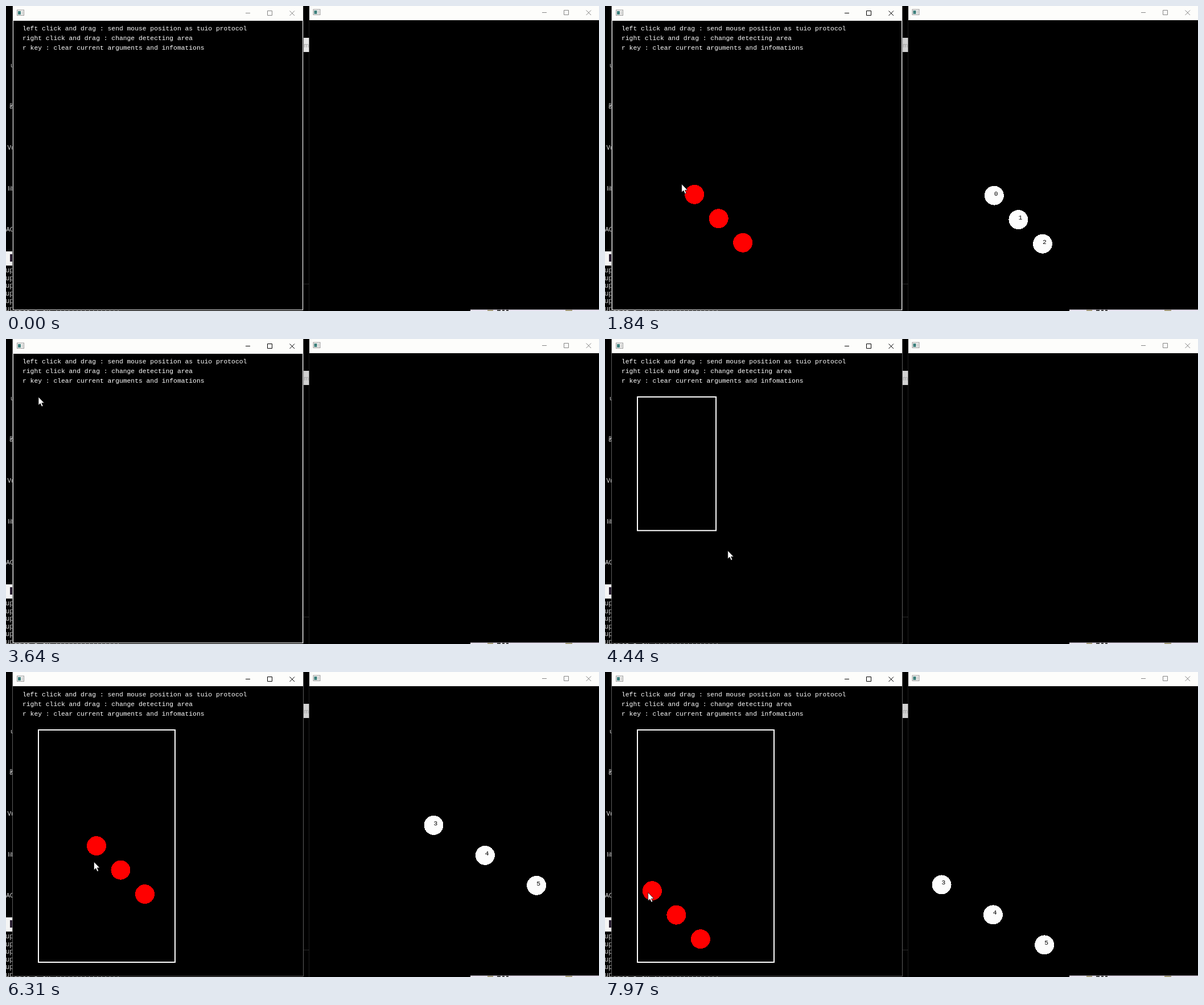
An HTML page that plays this animation: 1042 by 537 pixels, repeating every 8 s.

```html
<!DOCTYPE html>
<html lang="en">
<head>
<meta charset="utf-8">
<title>Touch simulator</title>
<style>
  html, body { margin: 0; width: 100%; height: 100%; overflow: hidden; background: #000; }
  svg { display: block; }
  circle { shape-rendering: crispEdges; }
  .help, .id { font: 11.333px "Liberation Mono", monospace; }
  .help { fill: #fff; }
  .id { fill: #000; }
  .console { font: 12px "Noto Sans Mono", monospace; fill: #bbb; }
  .label { font: 11px "Open Sans", sans-serif; fill: #e8e8e8; }
  .cjk { font: 10px "Noto Sans CJK JP", "Noto Sans CJK", sans-serif; }
  .tabName { font: 10px "Open Sans", sans-serif; fill: #999; }
  .buttons { fill: none; stroke: #858585; }
  .tab { fill: #e9e9e9; }
  .frame { fill: none; stroke: #222; }
  .active #left .buttons { stroke: #000; }
  .active .tab { fill: #d2d2d2; }
  .active .frame { stroke: #5c5c5c; }
</style>
</head>
<body>
<svg id="stage" width="1042" height="537" viewBox="0 0 1042 537">
  <defs>
    <clipPath id="edge"><rect width="12" height="537"/></clipPath>
    <clipPath id="gap"><rect x="522" width="11" height="537"/></clipPath>
    <clipPath id="rightView"><rect x="533" y="25" width="509" height="510"/></clipPath>
    <g id="appIcon">
      <rect x=".5" y=".5" width="12" height="9.5" fill="#f4f4f2" stroke="#999"/>
      <rect x="2" y="2.5" width="5" height="6" fill="#3d7f7c"/>
      <path d="M8.5 3.5h2.5M8.5 5.5h2.5M8.5 7.5h2.5" stroke="#b5b5b5"/>
    </g>
    <path id="controls" d="M0 4.5h8M38.5 .5h8v8h-8zM77.5 .5l8.5 8.5M86 .5l-8.5 8.5"/>
  </defs>
  <rect width="1042" height="537"/>

  <g id="behind">
    <g clip-path="url(#edge)">
      <text class="label" x="8" y="108">un</text>
      <text class="label cjk" x="6" y="180">器</text>
      <text class="label" x="2.5" y="253">Vul</text>
      <text class="label" x="3" y="325">lib</text>
      <text class="label" x="0" y="397">AC</text>
      <rect y="432" width="12" height="25" fill="#f5f5f5"/>
      <rect x="7" y="437" width="6" height="13" fill="#2b2033"/>
    </g>
    <g clip-path="url(#gap)">
      <path d="M532.5 25v512" stroke="#1c1c1c"/>
      <path d="M522 489.5h11" stroke="#292929"/>
      <rect class="tab" x="522" y="56" width="10.5" height="25"/>
      <text class="tabName" x="517" y="73">om</text>
    </g>
    <rect x="816" y="534.5" width="226" height="2.5" fill="#e4deec"/>
    <path d="M846 536h10M983 536h12" stroke="#a29a75" stroke-width="2"/>
    <path d="M863 536h6m3 0h4m3 0h4" stroke="#444" stroke-width="2"/>
  </g>

  <g id="left">
    <rect x="12" y="25" width="510" height="510"/>
    <rect class="frame" x="11.5" y=".5" width="511" height="535"/>
    <rect x="12" width="510" height="25" fill="#fdfdfb"/>
    <use href="#appIcon" x="19" y="6.5"/>
    <use class="buttons" href="#controls" x="421" y="8"/>
    <text class="help" x="29" y="43">left click and drag : send mouse position as tuio protocol</text>
    <text class="help" x="29" y="60">right click and drag : change detecting area</text>
    <text class="help" x="29" y="77">r key : clear current arguments and infomations</text>
    <rect id="area" fill="none" stroke="#fff"/>
    <g id="touches" fill="#f00"></g>
  </g>

  <g id="right">
    <rect x="533" width="509" height="25" fill="#fdfdfb"/>
    <use href="#appIcon" x="539.5" y="5.5"/>
    <use class="buttons" href="#controls" x="942" y="7"/>
    <g id="received" clip-path="url(#rightView)"></g>
  </g>

  <path id="cursor" d="M0 0V14.5L3.3 11.5L5.7 17L8.1 16L5.8 10.7H10.3Z" fill="#fff" stroke="#000" stroke-width=".7"/>
</svg>
<script>
const LOOP = 8000, DOT_LAG = 60, SEND_LAG = 74, SPACING = 42.5;
const SHOW_CURSOR = 70, AREA_START = 3800, AREA_END = 4860;
const FULL = { x: 12.5, y: 25.5, w: 509, h: 509.5 };
const RIGHT = { x: 533, y: 24, w: 510, h: 510 };
const circling = { from: 700, to: 3120, id: 0 };
const waving = { from: 5710, to: LOOP, id: 3 };

const ease = u => (1 - Math.cos(Math.PI * Math.min(1, Math.max(0, u)))) / 2;
const rad = degrees => degrees * Math.PI / 180;

// First drag: clockwise around an ellipse, starting and stopping gently
function circle(t) {
  const { from, to } = circling;
  const angle = rad(-72.5 + 453 * ease((t - from) / (to - from)));
  return { x: 197 + 90 * Math.cos(angle), y: 237.6 + 105 * Math.sin(angle) };
}

// Second drag: swings up and down while drifting left
function wave(t) {
  const s = Math.max(0, t - waving.from);
  const phase = rad(527 * (s / 2200) ** 1.1);
  return { x: 163 - 0.0382 * s + 18 * Math.sin(phase), y: 254.6 - 133.9 * Math.cos(phase) };
}

const entry = { x: 286, y: 505 }, corner = { x: 57, y: 102 };
const opposite = { x: 297, y: 511 }, pause = { x: 152, y: 148 };

function glide(t, from, to, a, b) {
  const u = ease((t - from) / (to - from));
  return { x: a.x + (b.x - a.x) * u, y: a.y + (b.y - a.y) * u };
}

function mouse(t) {
  if (t < circling.from) return glide(t, SHOW_CURSOR, 500, entry, circle(circling.from));
  if (t < circling.to) return circle(t);
  if (t < AREA_START) return glide(t, circling.to, 3550, circle(circling.to), corner);
  if (t < AREA_END + 100) return glide(t, AREA_START, AREA_END, corner, opposite);
  if (t < 5370) return glide(t, AREA_END + 100, 5370, opposite, pause);
  if (t < waving.from) return glide(t, 5370, waving.from, pause, wave(waving.from));
  return wave(t);
}

function areaAt(t) {
  if (t < AREA_START + DOT_LAG) return FULL;
  const end = mouse(Math.min(t - DOT_LAG, AREA_END));
  return { ...corner, w: end.x - corner.x, h: end.y - corner.y };
}

const $ = id => document.getElementById(id);
function set(el, attrs) {
  for (const name in attrs) el.setAttribute(name, attrs[name]);
}
function add(parent, tag, attrs = {}) {
  const el = document.createElementNS("http://www.w3.org/2000/svg", tag);
  set(el, attrs);
  return parent.appendChild(el);
}
const show = (el, on) => el.style.display = on ? "" : "none";
const move = (el, x, y) => el.setAttribute("transform", `translate(${x} ${y})`);

for (let i = 0; i < 6; i++) {
  const line = add($("behind"), "text", { class: "console", x: -1, y: 469 + i * 13.6 });
  line.textContent = i < 5 ? "up" : "update 5 OK ................";
}

const dots = [0, 1, 2].map(() => {
  const touch = add($("touches"), "circle", { r: 17 });
  const received = add($("received"), "g");
  add(received, "circle", { r: 17, fill: "#fdfdfd" });
  const label = add(received, "text", { class: "id" });
  return { touch, received, label };
});

function draw(t) {
  $("stage").classList.toggle("active", t >= circling.from);

  const area = areaAt(t);
  set($("area"), {
    x: area.x, y: area.y, width: area.w, height: area.h,
    "stroke-width": area === FULL ? 1 : 2
  });

  const tip = mouse(t);
  show($("cursor"), t >= SHOW_CURSOR);
  move($("cursor"), tip.x, tip.y);

  const drag = [circling, waving].find(d => t >= d.from && t < d.to);
  show($("touches"), drag);
  show($("received"), drag);
  if (!drag) return;

  const touched = mouse(Math.max(drag.from, t - DOT_LAG));
  const sent = mouse(Math.max(drag.from, t - SEND_LAG));
  dots.forEach(({ touch, received, label }, i) => {
    const shift = i * SPACING;
    move(touch, touched.x + shift, touched.y + shift);
    move(received,
      RIGHT.x + (sent.x + shift - area.x) / area.w * RIGHT.w,
      RIGHT.y + (sent.y + shift - area.y) / area.h * RIGHT.h);
    label.textContent = drag.id + i;
  });
}

const start = performance.now();
function tick() {
  draw((performance.now() - start) % LOOP);
  requestAnimationFrame(tick);
}
tick();
</script>
</body>
</html>
```
